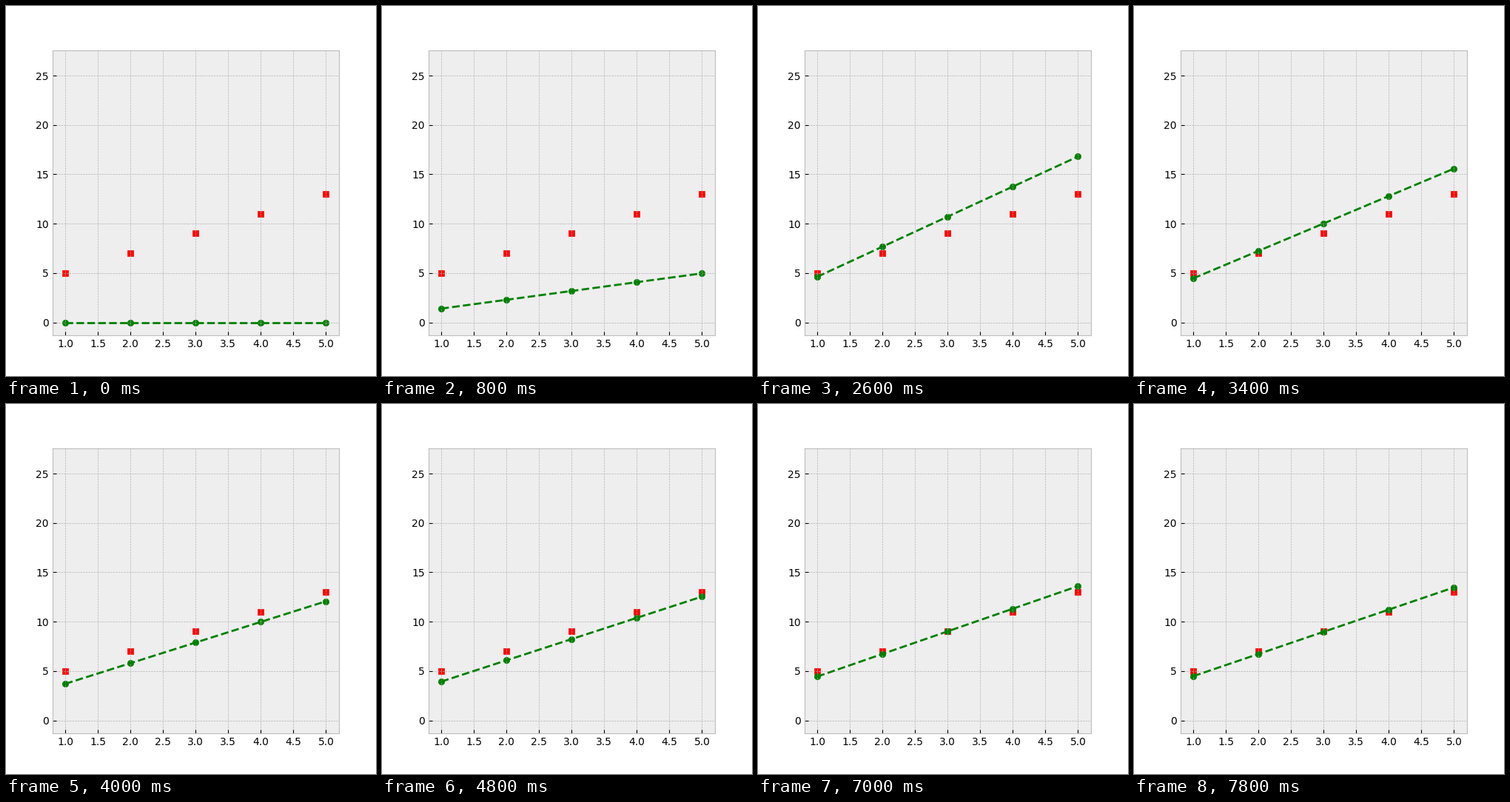
These frames come from a looping animation (500x500 px, 8000 ms). A matplotlib script:

```python
import numpy as np
import matplotlib.pyplot as plt
from matplotlib.animation import FuncAnimation

FRAMES = 40
INTERVAL = 200
RATE = 0.08

plt.rcParams.update({
    "font.family": "DejaVu Sans",
    "font.size": 10,
    "axes.facecolor": "#eeeeee",
    "axes.edgecolor": "#bcbcbc",
    "axes.grid": True,
    "axes.axisbelow": "line",
    "grid.color": "#b2b2b2",
    "grid.linestyle": "--",
    "grid.linewidth": 0.5,
    "lines.linewidth": 2.0,
    "patch.linewidth": 0.5,
    "xtick.direction": "in",
    "ytick.direction": "in",
})

x = np.arange(1.0, 6.0)
y = 2 * x + 3


def descend(steps):
    """Fit y = w*x + b by gradient descent on the mean squared error."""
    w = b = 0.0
    fits = []
    for _ in range(steps):
        fits.append(w * x + b)
        err = w * x + b - y
        w, b = w - RATE * 2 * np.mean(err * x), b - RATE * 2 * np.mean(err)
    return np.array(fits)


fits = descend(FRAMES)
top = fits.max()

fig, ax = plt.subplots(figsize=(5, 5), dpi=100)
ax.set_xlim(0.8, 5.2)
ax.set_ylim(-0.05 * top, 1.05 * top)

ax.scatter(x, y, c="red", marker="s")
dots = ax.scatter(x, fits[0], c="green", marker="o")
line, = ax.plot(x, fits[0], color="green", linestyle="--")


def update(i):
    dots.set_offsets(np.column_stack([x, fits[i]]))
    line.set_ydata(fits[i])
    return dots, line


anim = FuncAnimation(fig, update, frames=FRAMES, interval=INTERVAL,
                     repeat=True, repeat_delay=0)
plt.show()
```
